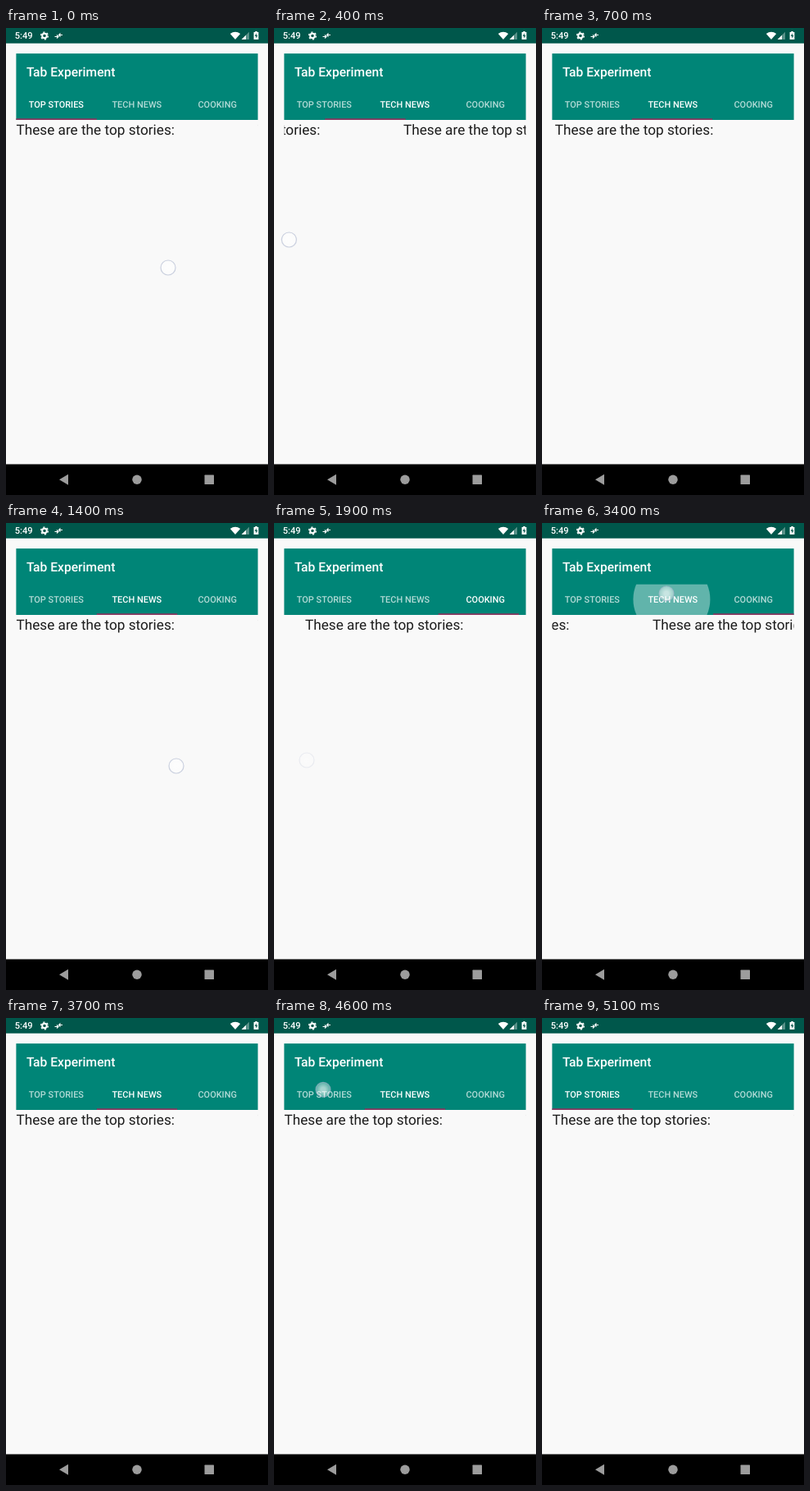
Animation, 320 px wide and 569 px high, one loop 6200 ms. Source, as an HTML page:

```html
<!DOCTYPE html>
<html lang="en">
<head>
<meta charset="utf-8">
<title>Tabs</title>
<style>
  html, body { margin: 0; width: 100%; height: 100%; overflow: hidden; background: #f9f9f9; }
  svg { display: block; width: 320px; height: 569px; font-family: Roboto, sans-serif; text-rendering: geometricPrecision; }
  .medium { font-weight: 500; fill: #fff; }
  .tab { font-size: 10.95px; text-anchor: middle; }
  .page { font-size: 17.22px; fill: #1c1c1c; }
</style>
</head>
<body>
<svg viewBox="0 0 320 569">
  <defs>
    <clipPath id="pager"><rect x="12.4" y="112" width="295.2" height="419"/></clipPath>
    <clipPath id="tabClip"><rect id="tabBox" y="74.7" width="98.4" height="37.3"/></clipPath>
    <radialGradient id="glow">
      <stop offset=".3" stop-color="#fff" stop-opacity=".65"/>
      <stop offset="1" stop-color="#fff" stop-opacity=".35"/>
    </radialGradient>
  </defs>
  <rect width="320" height="569" fill="#f9f9f9"/>

  <!-- status bar -->
  <rect width="320" height="18.7" fill="#00574b"/>
  <text class="medium" x="10.8" y="13.1" font-size="11.1">5:49</text>
  <g stroke="#fff" fill="none">
    <circle cx="47" cy="9.5" r="2.8" stroke-width="2"/>
    <circle cx="47" cy="9.5" r="4.4" stroke-width="1.3" stroke-dasharray="2.3 2.308"/>
    <path d="M59.5 10.5h4M62 8.5l2 2-2 2M69 8.5h-4M66.5 6.5l-2 2 2 2" stroke-width="1.1"/>
  </g>
  <path d="M273.8 7Q280 2.4 286.2 7L280 14Z" fill="#fff"/>
  <path d="M297 4.7V14H287.7Z" fill="#fff" fill-opacity=".35"/>
  <path d="M293 8.7V14H287.7Z" fill="#fff"/>
  <path d="M304.3 4h2.4v1h1.7v9h-5.8V5h1.7Z" fill="#fff"/>
  <path d="M306 6.3l-2.2 3.8h1.5v2.7l2.1-3.8h-1.4Z" fill="#00574b"/>

  <!-- app bar -->
  <rect x="12.4" y="31.1" width="295.2" height="80.9" fill="#008577"/>
  <text class="medium" x="24.9" y="59.2" font-size="15.62">Tab Experiment</text>
  <g clip-path="url(#tabClip)"><circle id="ripple" cy="93" fill="#fff"/></g>
  <g id="tabs"></g>
  <rect id="indicator" y="110.3" width="98.4" height="1.6" fill="#96305f"/>

  <g clip-path="url(#pager)"><g id="pages"></g></g>

  <!-- navigation bar -->
  <rect y="531.5" width="320" height="37.5" fill="#000"/>
  <g fill="#9c9c9c">
    <path d="M65 550.3L76 543.8V556.8Z"/>
    <circle cx="160" cy="550.3" r="5.7"/>
    <rect x="242.5" y="544.6" width="11.5" height="11.5" rx=".6"/>
  </g>

  <circle id="touch" r="9" fill="url(#glow)" stroke="#aab4cd" stroke-opacity=".6" stroke-width="1.2"/>
</svg>
<script>
const LOOP = 6200, STEP = 100;
const LEFT = 12.4, WIDTH = 295.2, TAB = WIDTH / 3;
const SLOP = 30;

// "at" is the finger going down, "go" the moment the pager is let go.
const gestures = [
  { at: 0, go: 412, from: 0, to: 1, x: 198, y: 292, endX: 13, endY: 257 },
  { at: 1400, go: 1760, from: 1, to: 2, x: 208, y: 296, endX: 40, endY: 289 },
  { at: 3310, go: 3345, from: 2, to: 1, x: 152, y: 86, tap: true },
  { at: 4600, go: 4776, from: 1, to: 0, x: 60, y: 87.3, tap: true }
];

const $ = id => document.getElementById(id);
const tabX = i => LEFT + i * TAB;
const clamp = (v, max = 1) => Math.min(max, Math.max(0, v));
const mix = (a, b, u) => a + (b - a) * u;
const ease = v => { const u = clamp(v); return u * u * (3 - 2 * u); };
const fade = (since, length) => clamp(1 - (since - 60) / length);

function set(el, attrs) {
  for (const name in attrs) el.setAttribute(name, attrs[name]);
}

function addText(parent, content, attrs) {
  const el = document.createElementNS(parent.namespaceURI, "text");
  el.textContent = content;
  set(el, attrs);
  parent.append(el);
  return el;
}

const labels = ["TOP STORIES", "TECH NEWS", "COOKING"].map((label, i) =>
  addText($("tabs"), label, { class: "medium tab", x: tabX(i + .5) - .2, y: 97.3 }));
for (let i = 0; i < 3; i++)
  addText($("pages"), "These are the top stories:", { class: "page", x: LEFT + i * WIDTH, y: 130.3 });

// The pages follow the finger, then glide to rest.
function swipe(g, t) {
  const u = clamp((t - g.at) / (g.go - g.at));
  const x = mix(g.x, g.endX, u), y = mix(g.y, g.endY, u);
  const dragged = g.from + Math.max(0, g.x - x - SLOP) / WIDTH;
  const since = Math.max(0, t - g.go);
  const rest = since < 480 ? Math.exp(-since / 77) : 0;
  const page = mix(g.to, dragged, rest);
  return { x, y, page, line: page, current: Math.round(page), radius: 0, strength: 0 };
}

// The pages jump quickly; the indicator slides after them.
function tap(g, t) {
  const since = t - g.go;
  return {
    x: g.x, y: g.y,
    page: mix(g.from, g.to, ease(since / 124)),
    line: mix(g.from, g.to, ease((since - 50) / 270)),
    current: since < 0 ? g.from : g.to,
    radius: clamp(36 + since * .2, 60),
    strength: .38 * fade(since, 240)
  };
}

function draw(t) {
  const g = gestures.findLast(g => g.at <= t);
  const s = g.tap ? tap(g, t) : swipe(g, t);

  set($("pages"), { transform: `translate(${-s.page * WIDTH} 0)` });
  set($("indicator"), { x: tabX(s.line) });
  labels.forEach((el, i) => set(el, { "fill-opacity": i === s.current ? 1 : .7 }));
  set($("touch"), { cx: s.x, cy: s.y, opacity: fade(t - g.go, 120) });
  set($("tabBox"), { x: tabX(g.to) });
  set($("ripple"), { cx: mix(s.x, tabX(g.to + .5), .8), r: s.radius, opacity: s.strength });
}

const start = performance.now();
function tick() {
  const t = (performance.now() - start) % LOOP;
  draw(Math.floor(t / STEP) * STEP);
  requestAnimationFrame(tick);
}
tick();
</script>
</body>
</html>
```
